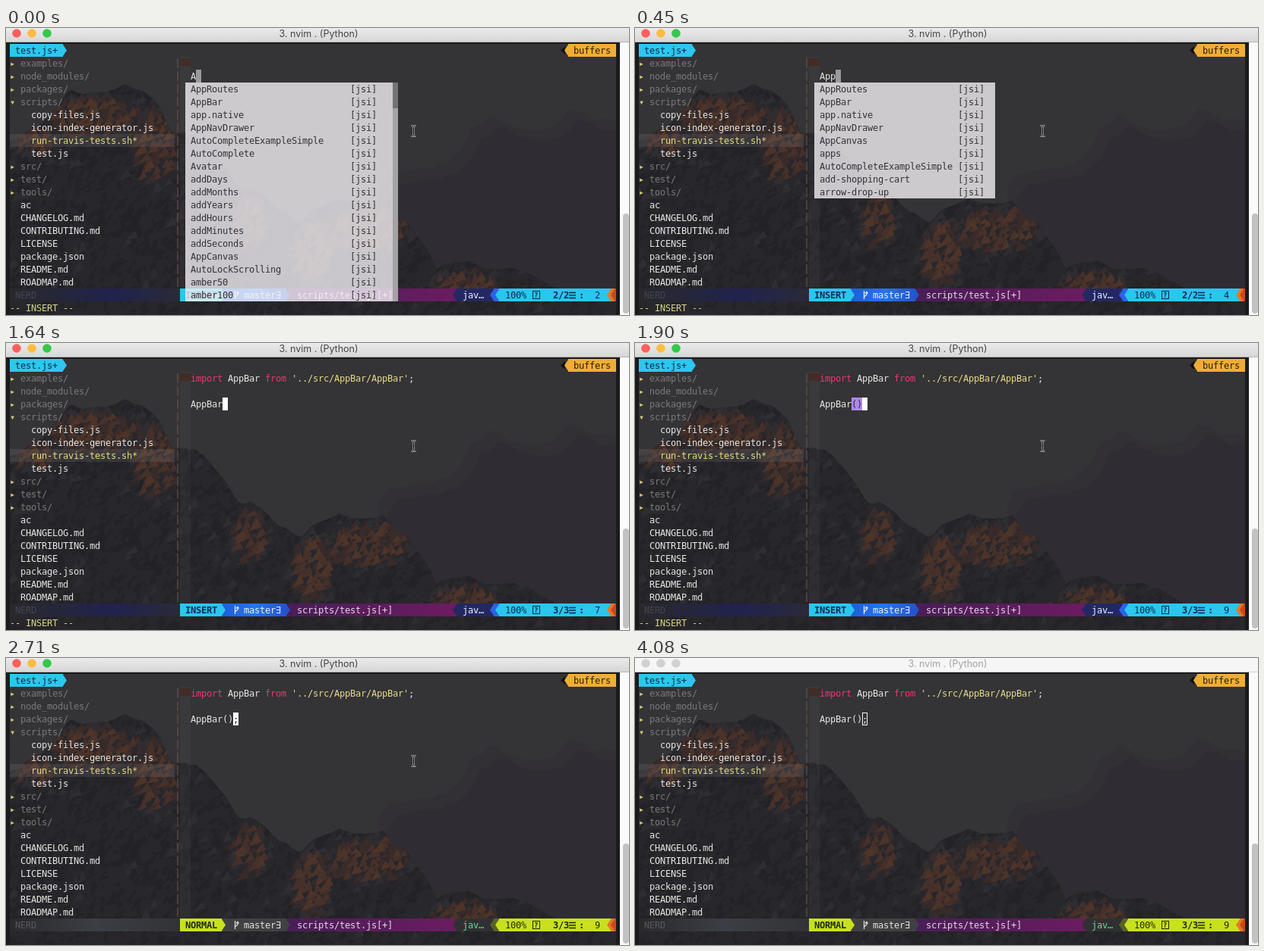
These frames come from a looping animation (820x379 px, 4180 ms). An HTML page:

```html
<!DOCTYPE html>
<html lang="en">
<head>
<meta charset="utf-8">
<title>Editor completion</title>
<style>
html, body { margin: 0; width: 100%; height: 100%; overflow: hidden; background: #1b1b1c; }
svg { display: block; width: 100vw; height: 100vh; }
text { font: 12px "DejaVu Sans Mono", "Liberation Mono", monospace; letter-spacing: -.2246px; white-space: pre; }
text.bold { font-weight: bold; }
text.tiny { font-size: 9px; font-weight: bold; }
text.title { font: 12.5px Inter, "Liberation Sans", sans-serif; letter-spacing: 0; text-anchor: middle; }
</style>
</head>
<body>
<svg viewBox="0 0 820 379" preserveAspectRatio="none">
  <defs>
    <linearGradient id="bar" x2="0" y2="1"><stop stop-color="#ebeaeb"/><stop offset="1" stop-color="#d8d7d8"/></linearGradient>
    <linearGradient id="blue"><stop stop-color="#1d5fd8"/><stop offset=".5" stop-color="#2674ee"/><stop offset="1" stop-color="#2450c4"/></linearGradient>
    <linearGradient id="purple"><stop stop-color="#4a1d58"/><stop offset=".5" stop-color="#6a1c60"/><stop offset="1" stop-color="#5b145c"/></linearGradient>
    <linearGradient id="navy"><stop stop-color="#29292c"/><stop offset=".3" stop-color="#25263c"/><stop offset=".6" stop-color="#20234e"/><stop offset="1" stop-color="#2a2a38"/></linearGradient>
    <linearGradient id="ash"><stop stop-color="#2a2a2d"/><stop offset=".5" stop-color="#3b3e44"/><stop offset="1" stop-color="#323337"/></linearGradient>
    <clipPath id="stage"><rect x="5" y="21" width="798" height="358"/></clipPath>
    <clipPath id="rock"><path id="rockShape"/></clipPath>
  </defs>
  <g id="back"></g>
  <g id="live"></g>
</svg>
<script>
const LOOP = 4180, CELL = 7, ROW = 17, LEFT = 243;
const $ = id => document.getElementById(id);
const esc = s => String(s).replace(/&/g, '&amp;').replace(/</g, '&lt;');
const rect = (x, y, w, h, fill, more = '') =>
  `<rect x="${x}" y="${y}" width="${w}" height="${h}" fill="${fill}" ${more}/>`;
const path = (d, fill, more = '') => `<path d="${d}" fill="${fill}" ${more}/>`;
const line = (d, color, width = 1, more = '') =>
  path(d, 'none', `stroke="${color}" stroke-width="${width}" ${more}`);
const text = (x, y, s, fill, cls = '') =>
  `<text x="${x}" y="${y}" fill="${fill}" class="${cls}">${esc(s)}</text>`;
const rowTop = n => 21 + ROW * n;
const rowText = (x, n, s, fill, cls) => text(x, rowTop(n) + 13, s, fill, cls);

let seed = 41;
const rnd = () => (seed = (seed * 16807) % 2147483647) / 2147483647;

// ---- wallpaper: key points roughened by midpoint displacement ----
const RIDGE = [[0, 152], [62, 110], [84, 82], [108, 86], [157, 74], [203, 104], [218, 138], [250, 141], [288, 182],
  [308, 212], [322, 210], [351, 234], [386, 256], [404, 240], [474, 232], [497, 228], [531, 260], [567, 318],
  [609, 307], [688, 324], [803, 352]];
const CLOUD = [[490, 212], [506, 192], [559, 186], [600, 160], [612, 133], [640, 115], [720, 130], [741, 107], [803, 124]];
// Sunlit faces: centre and radii.
const LIT = [[115, 108, 72, 32], [195, 145, 30, 62], [35, 138, 36, 20], [318, 245, 26, 42],
  [400, 288, 34, 52], [475, 255, 62, 34], [600, 328, 54, 20]];
const TONES = ['#232226', '#28272b', '#2e2d31', '#392b29', '#46302a', '#4d3429'];

function roughen(points, amount, depth = 2) {
  if (!depth) return points;
  const out = [];
  points.forEach(([x, y], i) => {
    out.push([x, y]);
    const next = points[i + 1];
    if (next) out.push([(x + next[0]) / 2, (y + next[1]) / 2 + (rnd() - .5) * amount * (next[0] - x)]);
  });
  return roughen(out, amount, depth - 1);
}
const silhouette = points => 'M' + points.map(p => p.join(' ')).join('L') + `V379H${points[0][0]}Z`;

function facets() {
  const paths = TONES.map(() => '');
  for (let y = 70; y < 384; y += 7) {
    for (let x = 0; x < 800; x += 9) {
      const light = Math.max(0, ...LIT.map(([cx, cy, rx, ry]) => 1 - ((x - cx) / rx) ** 2 - ((y - cy) / ry) ** 2));
      const shade = Math.min(1, light * 1.6) * 3.6 + rnd() * 2.4 - .3;
      const tone = Math.max(0, Math.min(light ? 5 : 2, Math.floor(shade)));
      const px = x + rnd() * 8, py = y + rnd() * 6, lean = 4 + rnd() * 9, h = 9 + rnd() * 9;
      paths[tone] += `M${px.toFixed(1)} ${py.toFixed(1)}l${-lean.toFixed(1)} ${h.toFixed(1)} ${(lean + 5).toFixed(1)} ${(-h / 3).toFixed(1)}z`;
    }
  }
  return paths.map((d, i) => path(d, TONES[i])).join('');
}

function wallpaper() {
  const cloud = silhouette(roughen(CLOUD, .3));
  $('rockShape').setAttribute('d', silhouette(roughen(RIDGE, .3)));
  return rect(0, 0, 820, 379, '#1b1b1c') + '<g clip-path="url(#stage)">' +
    rect(5, 21, 798, 358, '#343336') + path(cloud, '#323035') +
    path(cloud, '#2f2d33', 'transform="translate(12 14)"') +
    '<g clip-path="url(#rock)">' + rect(0, 60, 820, 319, TONES[1]) + facets() + '</g></g>';
}

// ---- fixed parts of the editor ----
function sidebar() {
  const tree = ['▸ examples/', '▸ node_modules/', '▸ packages/', '▾ scripts/', '    copy-files.js',
    '    icon-index-generator.js', '    run-travis-tests.sh*', '    test.js', '▸ src/', '▸ test/', '▸ tools/',
    '  ac', '  CHANGELOG.md', '  CONTRIBUTING.md', '  LICENSE', '  package.json', '  README.md', '  ROADMAP.md'];
  let out = rect(5, 140, 217, 17, '#fff', 'opacity=".08"');
  tree.forEach((s, i) => {
    const name = s.trimStart();
    if (s[0] !== ' ') out += rowText(5, i + 1, s[0], '#cfc97c') + rowText(19, i + 1, s.slice(2), '#7b7a79');
    else out += rowText(5 + (s.length - name.length) * CELL, i + 1, name, name.endsWith('*') ? '#e2dc83' : '#e6e5e1');
  });
  return out;
}

// A bar from x to end whose far side, left or right, is a point.
const TIP = 5;
function arrow(x, end, y, fill) {
  const tip = end + Math.sign(end - x) * TIP;
  return path(`M${x} ${y}H${end}V${y + 1}L${tip} ${y + 8.5} ${end} ${y + 16}V${y + 17}H${x}Z`, fill);
}

function frameParts() {
  return arrow(5, 75, 21, '#2cc7ef') + rowText(12, 0, 'test.js+', '#0a2948') +
    path('M736 24V35L730 29.5Z', '#111') + arrow(803, 740, 21, '#f0ad36') + rowText(747, 0, 'buffers', '#2a1c08') +
    line('M226 40V343', '#6a5a53', 1, 'stroke-dasharray="13 4"') +
    rect(229, 38, 14, 305, '#fff', 'opacity=".03"') + rect(229, 40, 14, 10, '#432c25') + sidebar() +
    rect(808, 18, 12, 361, '#fafafa') + rect(812, 245, 8, 132, '#c2c2c2', 'rx="4"');
}

// ---- changing parts ----
function pointer() {
  const beam = 'M533.5 129Q536.5 129 536.5 131.5V140.5Q536.5 143 533.5 143M539.5 129Q536.5 129 536.5 131.5M536.5 140.5Q536.5 143 539.5 143M535 136H538';
  return line(beam, '#d8d8d8', 2) + line(beam, '#1c1c1c', 1);
}

function titleBar(active) {
  const dots = active ? ['#fc605b', '#fdbc40', '#34c84a'] : Array(3).fill('#d2d1d2');
  return rect(0, 0, 820, 18, active ? 'url(#bar)' : '#f6f6f6') + rect(0, 18, 820, 1, active ? '#b4b4b4' : '#d0d0d0') +
    dots.map((c, i) => `<circle cx="${14 + 20 * i}" cy="7" r="5.8" fill="${c}"/>`).join('') +
    text(411.5, 12, '3. nvim . (Python)', active ? '#444' : '#a2a2a2', 'title');
}

function statusLine(s) {
  const ins = !s.normal, y = 344, base = 357;
  const key = ins ? '#2bc6ee' : '#c9e11c', dark = ins ? '#0b2950' : '#20290a';
  const ink = ins ? '#f0eff3' : '#e4e3e0';
  return rect(5, y, 224, 17, ins ? 'url(#navy)' : 'url(#ash)') + text(12, base, 'NERD', ins ? '#43454f' : '#57585a') +
    rect(369, y, 434, 17, 'url(#purple)') +
    arrow(284, 369, y, ins ? 'url(#blue)' : '#414144') + arrow(229, 284, y, key) +
    text(236, base, ins ? 'INSERT' : 'NORMAL', dark, 'bold') +
    line('M301.5 347V358M301.5 355L305 352V349M303 350.5L305 348.5 306.5 350.5', ink, 1.2) +
    text(313, base, 'master∃', ink) + text(383, base, 'scripts/test.js[+]', '#e4d9e4') +
    arrow(803, 593, y, ins ? '#232863' : '#303033') + text(601, base, 'jav…', ins ? '#eeeef4' : '#67dc98') +
    arrow(803, 642, y, ins ? '#2b62e6' : '#58612a') + arrow(803, 649, y, key) +
    text(657, base, '100%', dark) + rect(693.5, 347.5, 9, 10, 'none', `stroke="${dark}"`) +
    text(695, 356, '?', dark, 'tiny') + text(720, base, s.pos, dark, 'bold') +
    line('M741 349.5H750M741 353H750M741 356.5H750', dark, 1.5) +
    text(754, base, ':', dark, 'bold') + text(782 - CELL * String(s.col).length, base, s.col, dark) +
    arrow(803, 796, y, '#e8752c') + arrow(803, 801, y, '#c9481b') +
    (ins ? text(5, 374, '-- INSERT --', '#d6d38c') : '');
}

const ALL = ['AppRoutes', 'AppBar', 'app.native', 'AppNavDrawer', 'AutoCompleteExampleSimple', 'AutoComplete', 'Avatar',
  'addDays', 'addMonths', 'addYears', 'addHours', 'addMinutes', 'addSeconds', 'AppCanvas', 'AutoLockScrolling', 'amber50', 'amber100'];
const SOME = [...ALL.slice(0, 4), 'AppCanvas', 'apps', 'AutoCompleteExampleSimple', 'add-shopping-cart', 'arrow-drop-up'];

// nameCols is the width of the name column, in cells.
function popup(items, nameCols, { chosen, scroll, pad = 2 } = {}) {
  const h = items.length * ROW, tagX = LEFT + nameCols * CELL, width = tagX + (5 + pad) * CELL - LEFT;
  const ink = chosen ? '#0d2735' : '#333236', cls = chosen ? 'bold' : '';
  let out = rect(236, 72, width, h, chosen ? '#6dcbee' : '#f5f3f6', chosen ? '' : 'opacity=".79"');
  if (scroll) out += rect(236 + width, 72, 7, h, '#a3a2a5') + rect(236 + width, 72, 7, 34, '#737275');
  items.forEach((s, i) => {
    out += rowText(LEFT, 3 + i, s, ink, cls) + rowText(tagX, 3 + i, '[jsi]', ink, cls);
  });
  return out;
}
const MENUS = {
  all: () => popup(ALL, 30, { scroll: true, pad: 4 }),
  some: () => popup(SOME, 26, { pad: 3 }),
  one: () => popup(['AppBar'], 7, { pad: 4 }),
  pick: () => popup(['AppBar'], 7, { pad: 4, chosen: true })
};

function importLine() {
  const parts = [['import', '#f0356f'], [' AppBar ', '#e8e7e3'], ['from', '#f0356f'],
    [" '../src/AppBar/AppBar'", '#e6dc84'], [';', '#e8e7e3']];
  let col = 0, out = '';
  for (const [word, color] of parts) {
    out += rowText(LEFT + col * CELL, 1, word, color);
    col += word.length;
  }
  return out;
}

function codeArea(s, glow) {
  const n = s.imported ? 3 : 2, x = LEFT + s.at * CELL, y = rowTop(n);
  let out = s.imported ? importLine() : '';
  if (s.match) out += rect(285, y, 14, 17, '#ae87ea');
  out += rowText(LEFT, n, s.match ? s.word.slice(0, -2) : s.word, '#e8e7e3');
  if (s.match) out += rowText(285, n, '()', '#2b2038');
  if (s.hollow) return out + rect(x + .5, y + .5, 6, 16, 'none', 'stroke="#f2f2f2"');
  out += rect(x, y, 7, 17, '#fff', `opacity="${glow}"`);
  if (s.word[s.at] && glow > .5) out += rowText(x, n, s.word[s.at], '#222');
  return out;
}

// Each step keeps what the earlier ones set.
const STEPS = [
  [0, { word: 'A', at: 1, glow: .5, menu: 'all', pos: '2/2', col: 2 }],
  [180, { word: 'Ap', at: 2, menu: '', col: 3 }],
  [270, { menu: 'some' }],
  [360, { word: 'App', at: 3, menu: '', col: 4 }],
  [450, { menu: 'some' }],
  [540, { word: 'AppB', at: 4, menu: '', col: 5 }],
  [630, { menu: 'one' }],
  [1220, { word: 'AppBar', at: 6, glow: 1, menu: 'pick' }],
  [1640, { imported: true, menu: '', pos: '3/3', col: 7 }],
  [1820, { word: 'AppBar(', at: 7, col: 8 }],
  [1900, { word: 'AppBar()', at: 8, match: true, col: 9 }],
  [2080, { match: false, glow: .9 }],
  [2260, { word: 'AppBar();', at: 9, glow: .84, col: 10 }],
  [2530, { at: 8, glow: 1 }],
  [2710, { normal: true, col: 9 }],
  [4080, { hollow: true }]
];

// The idle cursor dims and returns in steps of 85 ms.
function blink(t) {
  if (t < 3340 || t >= 3940) return 1;
  const k = Math.floor((t - 3340) / 85) + 1;
  return .5 + .5 * Math.cos(k / 8 * 2 * Math.PI);
}

let shown = '';
function draw(t) {
  const s = Object.assign({}, ...STEPS.filter(([at]) => at <= t).map(step => step[1]));
  const glow = s.glow * blink(t), key = JSON.stringify(s) + glow;
  if (key === shown) return;
  shown = key;
  $('live').innerHTML = titleBar(!s.hollow) + statusLine(s) + codeArea(s, glow) +
    (s.menu ? MENUS[s.menu]() : '') + (s.hollow ? '' : pointer());
}

$('back').innerHTML = wallpaper() + frameParts();
const start = performance.now();
function tick() {
  draw((performance.now() - start) % LOOP);
  requestAnimationFrame(tick);
}
tick();
</script>
</body>
</html>
```
